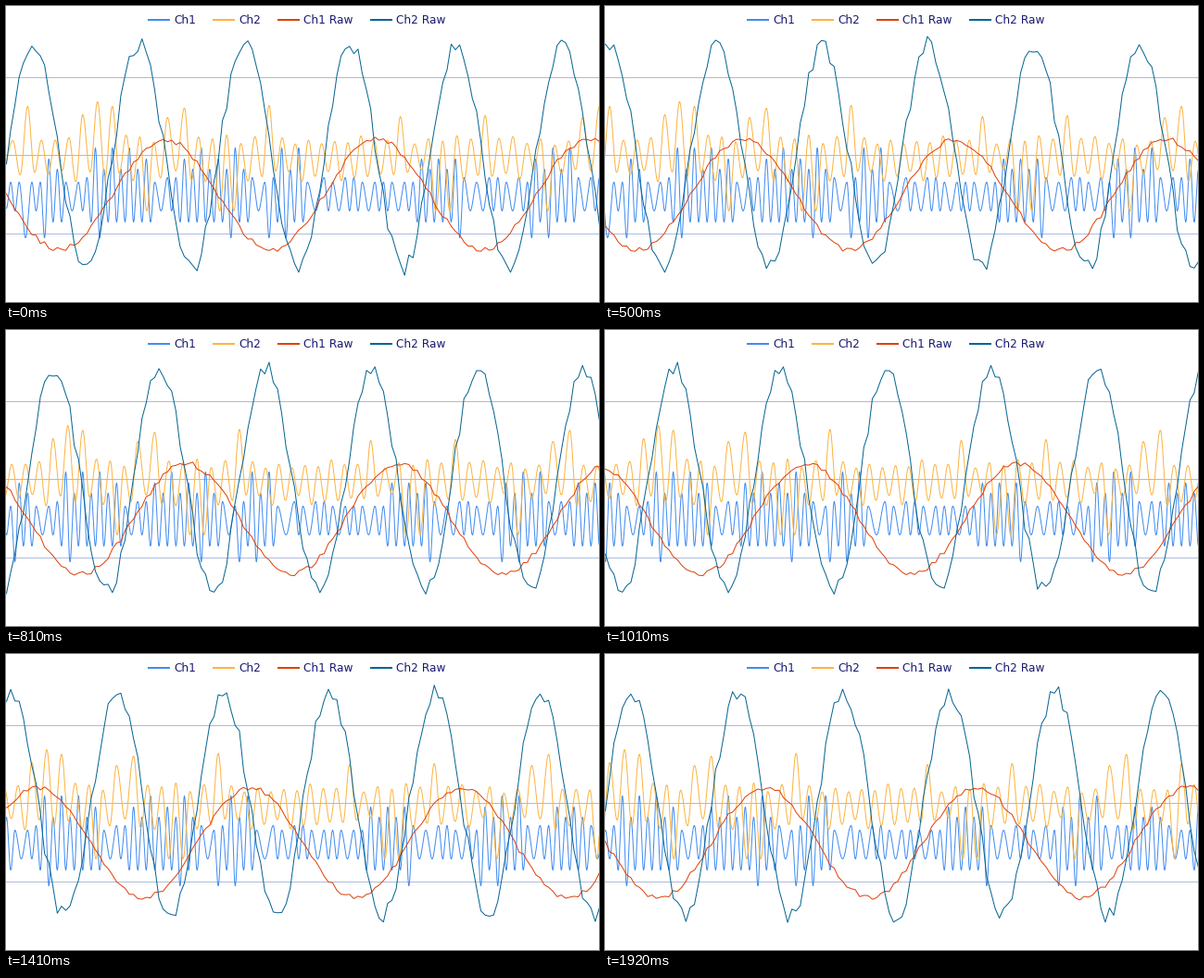
Recreate the animation shown at these times as a matplotlib script. Size 640x320 px, loop 2020 ms.

```python
import numpy as np
import matplotlib.pyplot as plt
from matplotlib.animation import FuncAnimation

W, H, DPI = 640, 320, 100
PX = 72 / DPI                 # one pixel in points
POINTS = 140                  # samples across the stage
DX = W / POINTS
TICK = 10
LOOP = 2020

BLUE, AMBER, RED, TEAL = "#418cf0", "#fcb441", "#e0400a", "#056492"
INK = "#191970"

# The chart refreshes in three bursts with a pause after each
REFRESH = np.concatenate([[0], np.arange(200, 701, 100),
                          np.arange(810, 1211, 100),
                          np.linspace(1410, 1920, 6)])

rng = np.random.default_rng(7)


def wave(start, peaks, valley, dips, depth):
    """Knots of a wave: a valley between each two peaks, deeper at the dips."""
    knots = [start, peaks[0]]
    for (xa, ya), (xb, yb) in zip(peaks, peaks[1:]):
        mid = (xa + xb) / 2
        deep = min(abs(mid - d) for d in dips) < 0.75
        knots += [(mid, depth if deep else valley(ya, yb)), (xb, yb)]
    return np.array(knots, float)


def smooth(knots, xs):
    """Rounded curve that is level at every knot."""
    kx, ky = knots.T
    i = np.clip(np.searchsorted(kx, xs, side="right") - 1, 0, len(kx) - 2)
    t = np.clip((xs - kx[i]) / (kx[i + 1] - kx[i]), 0, 1)
    return ky[i] + (ky[i + 1] - ky[i]) * (1 - np.cos(np.pi * t)) / 2


def ch1_peaks():
    """Runs with a peak every second sample, weak at both ends of a run."""
    starts = [1, 6, 17, 38, 61, 75, 80, 87, 94, 111, 114, 121, 138, 153, 162]
    peaks = []
    for a, b in zip(starts, starts[1:]):
        run = range(a, b - 2, 2)
        for i, x in enumerate(run):
            if i < 2 or i == len(run) - 1:
                top = rng.choice([185, 190])
            elif i % 2:
                top = 176
            else:
                top = rng.choice([153, 165])
            peaks.append((x, top))
    return peaks


def ch2_peaks():
    """Tall spikes with evenly spaced low humps between them."""
    spikes = [(1.5, 145), (5, 108), (18, 117), (21.5, 103), (25, 108),
              (38, 120), (42, 110), (62, 107), (93, 119), (113, 118),
              (136, 120), (140, 108), (153, 118), (159, 145)]
    peaks = []
    for (xa, ya), (xb, _) in zip(spikes, spikes[1:]):
        gaps = max(1, round((xb - xa) / 3.2))
        peaks.append((xa, ya))
        peaks += [(xa + (xb - xa) * k / gaps, rng.uniform(139, 150))
                  for k in range(1, gaps)]
    return peaks + spikes[-1:]


fine = np.arange(0, 158.5, 0.1)
ch1 = smooth(wave((0, 218), ch1_peaks(),
                  lambda a, b: 233 if min(a, b) < 180 else 221,
                  [5, 9, 22, 53, 62, 66, 107, 124, 128], 250), fine)
ch2 = smooth(wave((-1, 180), ch2_peaks(),
                  lambda a, b: rng.uniform(176, 190),
                  [33, 50, 53, 101, 105, 128, 151], 221), fine)

# Raw channels: noisy sines that move on in blocks of 15 samples
BLOCK = 15
n = np.arange(BLOCK * 30 + POINTS + 1)
raw1 = 203.5 + 59.5 * np.sin(2 * np.pi * n / 50) + rng.uniform(-3, 3, n.size)
raw2 = 162 - 121 * np.sin(2 * np.pi * n / 25) + rng.uniform(-9, 9, n.size)

fig = plt.figure(figsize=(W / DPI, H / DPI), dpi=DPI, facecolor="white")
ax = fig.add_axes([0, 0, 1, 1])
ax.set_xlim(-0.5, W - 0.5)
ax.set_ylim(H - 0.5, -0.5)
ax.axis("off")

for y, shade in ((77, "#b9b9bf"), (161, "#b9b9bf"), (246, "#adbcdc")):
    ax.plot([-1, W], [y, y], color=shade, lw=PX, snap=False)


def trace(color):
    return ax.plot([], [], color=color, lw=PX, solid_joinstyle="round")[0]


ch1_line, ch2_line, raw1_line, raw2_line = map(trace, (BLUE, AMBER, RED, TEAL))

for x, label, color in ((153, "Ch1", BLUE), (223, "Ch2", AMBER),
                        (293, "Ch1 Raw", RED), (393, "Ch2 Raw", TEAL)):
    ax.plot([x - 0.5, x + 23.5], [14.5, 14.5], color=color, lw=2 * PX,
            solid_capstyle="butt", snap=False)
    ax.text(x + 27.5, 18.8, label, color=INK, family="DejaVu Sans",
            fontsize=12.1 * PX, va="baseline")


def update(frame):
    step = np.searchsorted(REFRESH, frame * TICK, side="right") - 1
    ch1_line.set_data((fine - step) * DX, ch1)
    ch2_line.set_data((fine - step) * DX, ch2)
    first = BLOCK * int(1.78 * step + 0.65)
    shown = slice(first, first + POINTS + 1)
    xs = np.arange(POINTS + 1) * DX
    raw1_line.set_data(xs, raw1[shown])
    raw2_line.set_data(xs, raw2[shown])
    return ch1_line, ch2_line, raw1_line, raw2_line


anim = FuncAnimation(fig, update, frames=LOOP // TICK, interval=TICK,
                     repeat=True, repeat_delay=0, blit=False)
plt.show()
```
